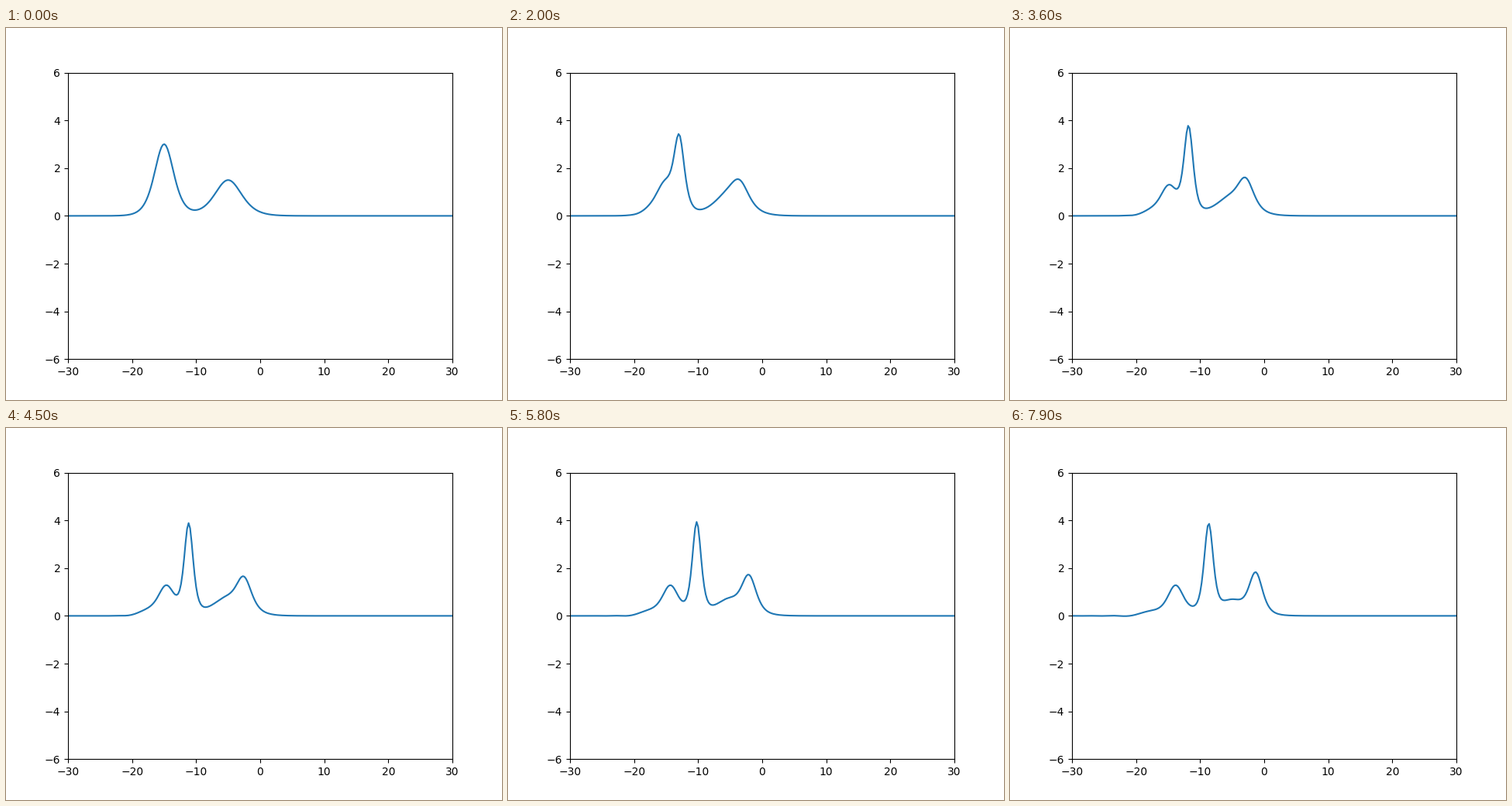
Write a matplotlib script that moves like this. It is 640 by 480 pixels and loops after 8 s.

```python
import numpy as np
import matplotlib.pyplot as plt
from matplotlib.animation import FuncAnimation

# Korteweg-de Vries waves: u_t + A u u_x + B u_xxx = 0
A, B = 0.5, 0.125
N, HALF = 256, 30
FRAMES, INTERVAL = 80, 100
STEPS = 10
DT = INTERVAL / 1000 / STEPS

x = np.linspace(-HALF, HALF, N)
k = 2 * np.pi * np.fft.rfftfreq(N, x[1] - x[0])
half = np.exp(0.5j * B * k**3 * DT)
full = half**2


def hump(c, x0):
    return 3 * c / np.cosh(np.sqrt(c) / 2 * (x - x0)) ** 2


def flux(v):
    return -0.5j * A * k * np.fft.rfft(np.fft.irfft(v, N) ** 2)


def step(v):
    """Integrating-factor RK4 step in Fourier space."""
    k1 = flux(v)
    k2 = flux(half * (v + DT / 2 * k1))
    k3 = flux(half * v + DT / 2 * k2)
    k4 = flux(full * v + DT * half * k3)
    return full * v + DT / 6 * (full * k1 + 2 * half * (k2 + k3) + k4)


def solve():
    u = hump(1.0, -15) + hump(0.5, -5)
    v = np.fft.rfft(u)
    waves = [u]
    for _ in range(FRAMES - 1):
        for _ in range(STEPS):
            v = step(v)
        waves.append(np.fft.irfft(v, N))
    return waves


waves = solve()

fig, ax = plt.subplots(figsize=(6.4, 4.8), dpi=100)
ax.set_xlim(-HALF, HALF)
ax.set_ylim(-6, 6)
line, = ax.plot(x, waves[0])


def update(i):
    line.set_ydata(waves[i])
    return line,


anim = FuncAnimation(fig, update, frames=FRAMES, interval=INTERVAL,
                     repeat=True, repeat_delay=0)
plt.show()
```
